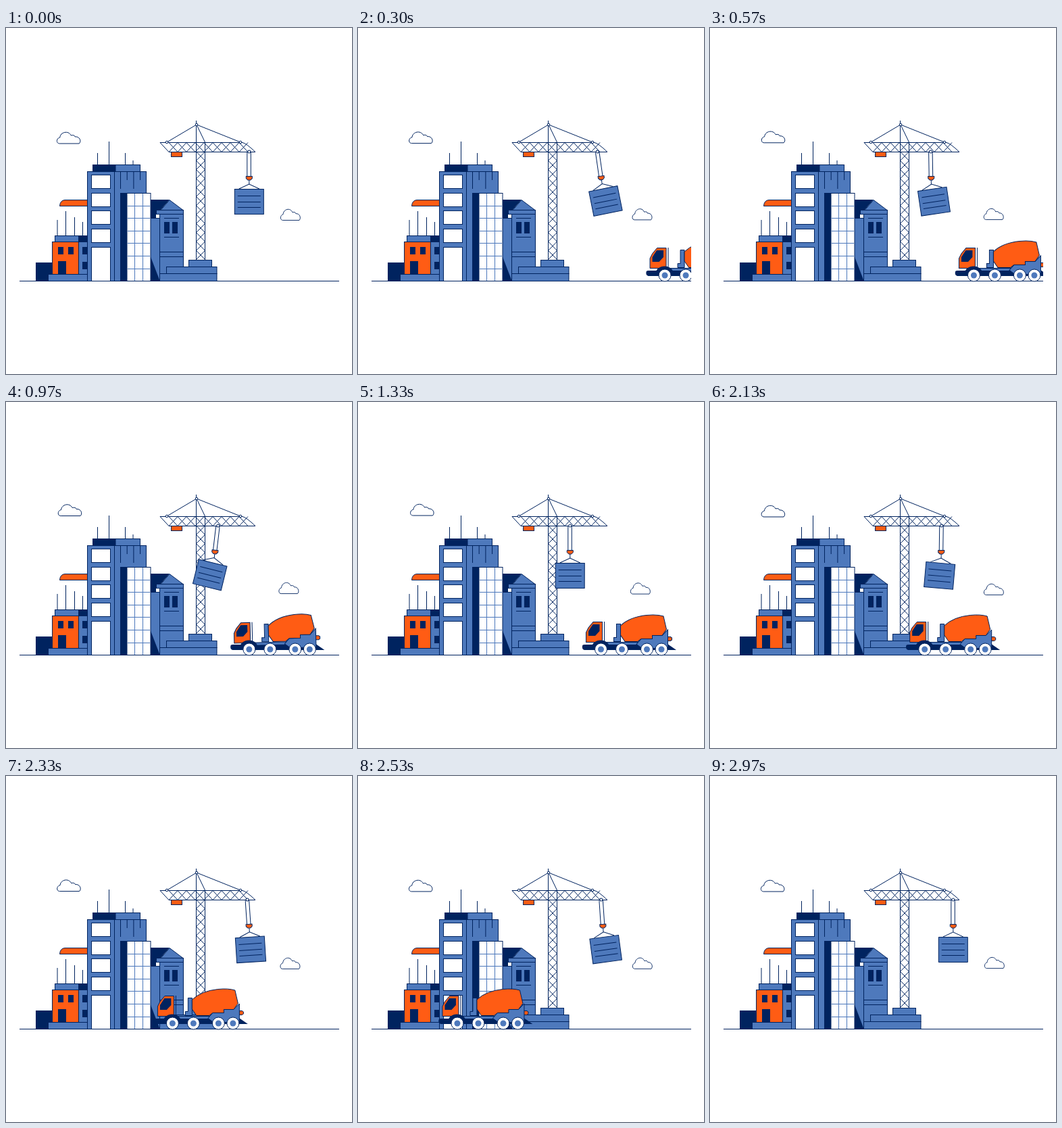
An HTML page for the animation above (3.03 s loop, 512 by 512 pixels).

```html
<!DOCTYPE html>
<html lang="en">
<head>
<meta charset="utf-8">
<title>Construction site</title>
<style>
  html, body { margin: 0; width: 100%; height: 100%; overflow: hidden; background: #fff; }
  svg { display: block; width: 100vw; height: 100vh; }
  .b { fill: #4e79bc; }
  .n { fill: #00235f; }
  .o { fill: #ff5c14; }
  .w { fill: #fff; }
  .s { stroke: #00235f; }
  .l { fill: none; stroke: #00235f; }
  .g { fill: none; stroke: #4e79bc; }
</style>
</head>
<body>
<svg viewBox="0 0 512 512">
  <defs>
    <clipPath id="stage"><rect x="20" y="130" width="473" height="250"/></clipPath>
    <path id="cloud" d="M4 17C-1.500 17-1 9 4.500 8C5 0 17-3 21 5C24 4 26.500 5 27 7C33 6 37 13 33 17Z"/>
  </defs>
  <use id="cloudA" href="#cloud" class="l"/>
  <g id="cloudB"><use href="#cloud" class="l" transform="scale(.84 .97)"/></g>
  <path class="l" d="M20 374.500H493"/>
  <g id="city"></g>
  <g id="crane"></g>
  <g id="trolley">
    <path class="l" d="M-3 1V37M2.500 1V37"/>
    <circle class="w s" r="2"/>
    <path class="l" d="M0 42V48"/>
    <path class="o s" d="M-4.500 36.500H4.500V39.500L2 42H-2L-4.500 39.500Z"/>
    <g id="load">
      <path class="l" d="M-15 55L0 48L15 55"/>
      <rect class="b s" x="-21.500" y="55.500" width="43" height="37"/>
      <path class="l" d="M-17 65.500H17M-17 74.500H17M-17 82.500H17"/>
    </g>
  </g>
  <g clip-path="url(#stage)">
    <g id="truck">
      <path class="n" d="M0 361Q0 359 3 359H82L88 362L126 358L139 367H3Q-1 366 0 361Z"/>
      <g id="body">
        <path class="b s" d="M46.500 354.500V348.500H50.500V328.500H56.500V354.500Z"/>
        <path class="b s" d="M33 355.500H84L80 359.500H33Z"/>
        <path class="o s" d="M126 347.500H130.500L132.500 349V352L130.500 353.500H126Z"/>
        <path class="b s" d="M80 358.500L87 350.500H103V345.500H118L126.500 337V364.500H88Z"/>
        <path class="o s" d="M56.500 331Q70 318 95 315.500Q110 314 120 317L124.500 336.500L118 345.500H103.500V350.500H87L82 354.500H63L56.500 345Z"/>
        <path class="o s" d="M5.500 355.500V341L9 334L16 325.500H29.500V355.500Z"/>
        <path class="n" d="M9 346V339L15.500 329H25.500V339L19 346Z"/>
        <path class="l" d="M32.500 325V355"/>
      </g>
      <path class="n" d="M14 363A13 10.500 0 0 1 40 363Z"/>
      <g id="wheels"></g>
    </g>
  </g>
</svg>
<script>
const LOOP = 3030;
const el = id => document.getElementById(id);
const each = (n, make) => Array.from({ length: n }, (_, i) => make(i)).join('');
const rect = (cls, x, y, w, h) =>
  `<rect class="${cls}" x="${x}" y="${y}" width="${w}" height="${h}"/>`;
const path = (cls, d) => `<path class="${cls}" d="${d}"/>`;
const circle = (cls, x, y, r) => `<circle class="${cls}" cx="${x}" cy="${y}" r="${r}"/>`;
const pole = (x, top, bottom) => path('l', `M${x} ${top}V${bottom}`);

const house =
  rect('n', 44, 347, 25, 28) +
  rect('b s', 62.5, 364.5, 58, 10) +
  rect('b s', 107.5, 316.5, 14, 48) +
  rect('o s', 68.5, 316.5, 39, 48) +
  rect('b s', 72.5, 307.5, 35, 9) +
  rect('n', 107, 307, 14, 10) +
  [77, 92, 113].map(x => rect('n', x, 324, 8, 11)).join('') +
  rect('n', 113, 346, 8, 11) +
  rect('n', 77, 345, 12, 20) +
  pole(76, 284, 307) + pole(88.5, 271, 307) + pole(101.5, 280, 307) + pole(113.5, 287, 307) +
  path('o s', 'M79.500 263.500H121V254.500H87Q80 255 79.500 263.500Z');

const annex =
  rect('b s', 213.5, 281.5, 15, 93) +
  path('n', 'M213 336L228 375H213Z') +
  path('n', 'M213 254H242L229 269L222 276V281H213Z') +
  path('b s', 'M242 254.500L262 269.500H229Z') +
  rect('b s', 227.5, 275.5, 35, 99) +
  rect('b s', 222.5, 269.5, 40, 6) +
  rect('n', 234, 287, 8, 17) +
  rect('n', 246, 287, 8, 17) +
  path('l', 'M234 281.500H256M234 309.500H256M228 331.500H262M228 338.500H262') +
  rect('b s', 270.5, 343.5, 34, 10) +
  rect('b s', 227.5, 363.5, 84.5, 11) +
  rect('b s', 237.5, 353.5, 74.5, 10);

const tower =
  rect('b s', 160.5, 212.5, 47, 162) +
  each(4, i => pole(169.5 + i * 9.7, 212, i % 2 ? 225 : 238)) +
  rect('n', 169, 244, 10, 131) +
  rect('w s', 179, 244.5, 35, 130) +
  path('g', 'M190.500 245V374M202.500 245V374' +
    each(6, i => `M180 ${Math.floor(263 + i * 18.6) + .5}H213`)) +
  rect('b s', 120.5, 212.5, 40, 162) +
  each(4, i => rect('w s', 126.5, 217.5 + Math.round(i * 26.7), 28, 20)) +
  rect('w s', 126.5, 324.5, 28, 50) +
  rect('n', 128, 202, 34, 10) +
  rect('b s', 162, 202.5, 36.5, 10) +
  pole(135.5, 185, 202) + pole(152.5, 168, 202) + pole(176.5, 185, 202) + pole(188, 196, 202);

el('city').innerHTML = house + annex + tower;

const cross = (x, y, w, h) => `M${x} ${y}l${w} ${h}M${x + w} ${y}l${-w} ${h}`;
el('crane').innerHTML =
  path('l', each(12, i => cross(281.5, 183 + i * 13.3, 13, 13.3)) +
    each(9, i => cross(241 + i * 13, 169.5, 13, 14))) +
  path('l', 'M281.500 137V343M294.500 169V343M282 143L294.500 169M238 169L282 143L347 169') +
  path('l', 'M228 169.500H350Q356 171 369 183.500H241Z') +
  circle('w s', 282, 143, 1.8) + circle('w s', 238, 169, 1.8) + circle('w s', 347, 169, 1.8) +
  rect('o s', 244.5, 183.5, 16, 7);

el('wheels').innerHTML = [27.5, 58.5, 95.5, 117].map(x =>
  circle('w s', x, 366, 9) + circle('b', x, 366, 4.5)).join('');

const clamp = u => Math.min(1, Math.max(0, u));
const easeInOut = u => u < .5 ? 4 * u ** 3 : 1 - 4 * (1 - u) ** 3;

// trolley runs to the mast and back
const trolleyX = t =>
  359.8 - 46 * (easeInOut(clamp(t / 970)) - easeInOut(clamp((t - 1600) / 970)));

// one lag and overshoot of the load, dying out
const sway = t => {
  const a = Math.PI * clamp(t / 1360);
  return -Math.sin(2 * a) * Math.sin(a);
};
const swing = t => 18 * sway(t) - 10 * sway(t - 1570);

// truck rolls in, brakes, waits and drives off
const truckX = t =>
  332 + 220 * clamp(1 - t / 1050) ** 2.5 - 212 * Math.max(0, (t - 1870) / 660) ** 1.75;
const brakeDip = t => -1.5 * Math.exp(-(((t - 970) / 130) ** 2));

const move = (id, value) => el(id).setAttribute('transform', value);

function draw(t) {
  const drift = (1 - Math.cos(2 * Math.PI * clamp(t / 2650))) / 2;
  const rope = .6 * swing(t + 90) * clamp(t / 200);
  move('cloudA', `translate(${75.3 + 2.2 * drift} ${154 - 3 * drift})`);
  move('cloudB', `translate(${406.3 - 3 * drift} ${268 - Math.sin(2 * Math.PI * t / LOOP)})`);
  move('trolley', `translate(${trolleyX(t)} 183) rotate(${rope})`);
  move('load', `rotate(${swing(t) - rope} 0 46)`);
  move('truck', `translate(${truckX(t)} 0)`);
  move('body', `rotate(${brakeDip(t)} 60 358)`);
}

const start = performance.now();
function tick() {
  draw((performance.now() - start) % LOOP);
  requestAnimationFrame(tick);
}
tick();
</script>
</body>
</html>
```
